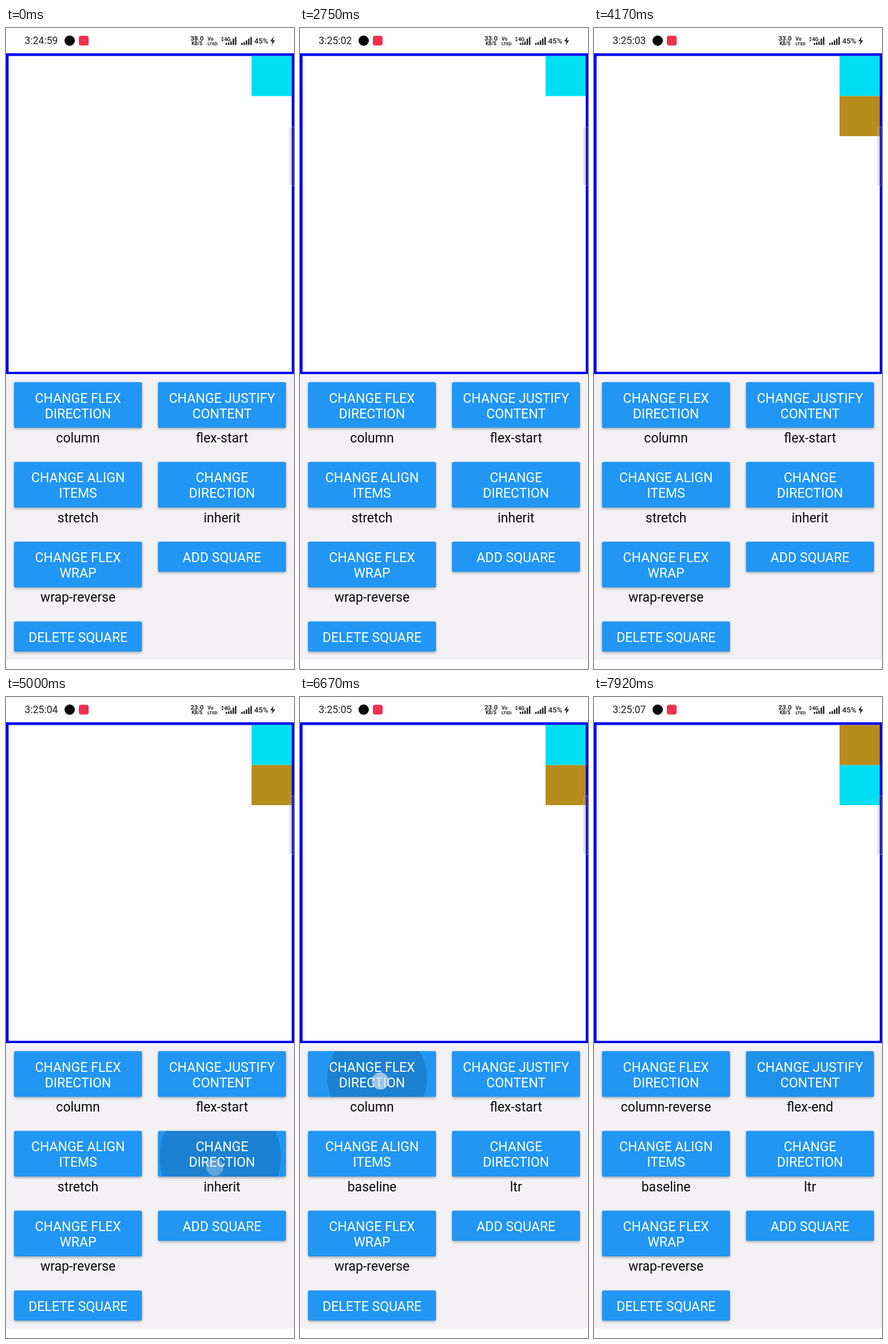
Animation, 502 px wide and 1115 px high, one loop 8 s. Source, as an HTML page:

```html
<!DOCTYPE html>
<html lang="en">
<head>
<meta charset="utf-8">
<title>Flex layout playground</title>
<style>
  html, body { margin: 0; width: 100%; height: 100%; overflow: hidden; background: #fefefe; }
  svg { display: block; width: 100vw; height: 100vh; }
  text { font-family: Roboto, "Noto Sans", sans-serif; }
  .caption { font-size: 23px; fill: #fff; text-anchor: middle; }
  .value { font-size: 23px; fill: #0a0a0a; text-anchor: middle; }
  .status { fill: #222; }
  .tiny { font-weight: 700; text-anchor: middle; }
  .face { fill: #2196f3; filter: drop-shadow(0 2.5px 2px rgba(0, 0, 0, .3)); }
</style>
</head>
<body>
<svg id="stage" viewBox="0 0 502 1115" xmlns="http://www.w3.org/2000/svg"></svg>
<script>
const LOOP = 8000;
const STEP = 250 / 3;
const stage = document.getElementById('stage');

function add(tag, attrs = {}, parent = stage, content = '') {
  const node = document.createElementNS('http://www.w3.org/2000/svg', tag);
  for (const key in attrs) node.setAttribute(key, attrs[key]);
  node.textContent = content;
  parent.appendChild(node);
  return node;
}
const rect = (x, y, width, height, fill, more = {}) =>
  add('rect', { x, y, width, height, fill, ...more });
const text = (x, y, cls, content, more = {}) =>
  add('text', { x, y, class: cls, ...more }, stage, content);
const set = (node, attrs) => {
  for (const key in attrs) node.setAttribute(key, attrs[key]);
};
const clamp = v => Math.max(0, Math.min(1, v));
const mix = (a, b, p) => a + (b - a) * p;

// Page background and status bar
rect(0, 0, 502, 1115, '#fefefe');
const clock = text(32.5, 28, 'status', '', { 'font-size': 17.6 });
add('circle', { cx: 111, cy: 22, r: 9, fill: '#050505' });
rect(127, 13.5, 17, 17, '#f0304f', { rx: 4 });
const speed = text(333, 22.3, 'status tiny', '', { 'font-size': 11.4 });
text(333, 30, 'status tiny', 'KB/S', { 'font-size': 8.4 });
text(356.5, 21.5, 'status tiny', 'Vo', { 'font-size': 8.6 });
text(360, 30, 'status tiny', 'LTED', { 'font-size': 7.8 });
add('path', { d: 'M375 18.2l2.3-3 2.3 3zM375 20.2l2.3 3 2.3-3z', class: 'status' });
text(385.8, 23, 'status tiny', '4G', { 'font-size': 9 });
function signal(x, heights) {
  heights.forEach((h, i) => rect(x + i * 4, 29.5 - h, 2.5, h, '#222'));
}
signal(383, [3.5, 4.5, 6, 11, 14]);
signal(410, [3.5, 5, 8, 11, 14]);
text(432.5, 27, 'status', '45%', { 'font-size': 13.3, 'font-weight': 500 });
add('path', { d: 'M466.5 15l-6 8.2h4l-1.6 6.8 6.3-8.4h-4.1z', class: 'status' });

// Flex container and its squares
rect(0, 602, 502, 497, '#f3f1f4');
rect(0, 44, 502, 558, '#0000f2');
rect(4.5, 48.7, 493.5, 549.3, '#fefdff');
const cyan = rect(428, 48.7, 70, 69.7, '#00def4');
const gold = rect(428, 118.4, 70, 69.7, '#b68c1c');
rect(494.5, 172, 14, 102, '#808080', {
  rx: 4, 'fill-opacity': .25, stroke: '#ccc', 'stroke-opacity': .5
});

// Buttons
const defs = add('defs');
function button(column, row, lines, value) {
  const x = column ? 265 : 14;
  const y = 616 + row * 138.75;
  const width = 223;
  const height = lines.length > 1 ? 79.6 : 52.6;
  const cx = x + width / 2;
  const box = { x, y, width, height, rx: 2.8 };
  const id = `clip-${column}-${row}`;
  add('rect', box, add('clipPath', { id }, defs));
  add('rect', { ...box, class: 'face' });
  const ripple = add('circle', { 'clip-path': `url(#${id})`, fill: '#000', opacity: 0 });
  lines.forEach((line, i) => text(cx, y + 35.6 + i * 27, 'caption', line));
  const label = value ? text(cx, y + 104.8, 'value', value) : null;
  return { cx, cy: y + height / 2, reach: Math.hypot(width, height) / 2, ripple, label };
}
const direction = button(0, 0, ['CHANGE FLEX', 'DIRECTION'], 'column');
const justify = button(1, 0, ['CHANGE JUSTIFY', 'CONTENT'], 'flex-start');
const align = button(0, 1, ['CHANGE ALIGN', 'ITEMS'], 'stretch');
const writing = button(1, 1, ['CHANGE', 'DIRECTION'], 'inherit');
button(0, 2, ['CHANGE FLEX', 'WRAP'], 'wrap-reverse');
const adder = button(1, 2, ['ADD SQUARE']);
button(0, 3, ['DELETE SQUARE']);

// Taps: finger position, ripple origin, start, fade length, moment the value changes
const taps = [
  { on: adder, x: 356, y: 941, start: 3580, life: 560, change: 3660 },
  { on: writing, x: 364, y: 818, start: 4830, visible: 4910, life: 480, change: 5075,
    values: ['inherit', 'ltr'] },
  { on: align, x: 173, y: 799, originX: 101, start: 5955, life: 430, change: 6160,
    values: ['stretch', 'baseline'] },
  { on: direction, x: 140, y: 668, start: 6580, life: 470, change: 6745,
    values: ['column', 'column-reverse'] },
  { on: justify, x: 390, y: 668, start: 7580, life: 390, change: 7745,
    values: ['flex-start', 'flex-end'] }
];
const finger = add('circle', { r: 14.5, fill: '#d3e2ee', stroke: '#e6eef4', 'stroke-width': 1 });

function drawTap(tap, t) {
  const { on } = tap;
  const age = t - tap.start;
  const shown = age >= 0 && t >= (tap.visible || 0);
  const grow = clamp(age / 225);
  const startRadius = 67;
  const fade = clamp(age / 60) * clamp((tap.life - age) / (tap.life - 170));
  set(on.ripple, {
    cx: mix(tap.originX || tap.x, on.cx, grow),
    cy: mix(tap.y, on.cy, grow),
    r: mix(startRadius, on.reach, grow),
    opacity: shown ? .14 * fade : 0
  });
  if (tap.values) on.label.textContent = tap.values[+(t >= tap.change)];
  if (age >= -40 && age < 250 && t >= (tap.visible || 0)) {
    set(finger, { cx: tap.x, cy: tap.y, opacity: .7 * clamp((250 - age) / 150) });
  }
}

function drawSquares(t) {
  const top = 48.7, side = 69.7, bottom = 598;
  const [added, reversed, ended] = [taps[0], taps[3], taps[4]].map(tap => t >= tap.change);
  const first = ended ? top + side : reversed ? bottom - side : top;
  const second = reversed ? first - side : first + side;
  set(cyan, { y: first });
  set(gold, { y: second, opacity: +added });
}

function render(now) {
  const t = Math.floor((now % LOOP + 5) / STEP) * STEP;
  const seconds = 59 + Math.floor((t + 255) / 1000);
  clock.textContent = seconds < 60 ? '3:24:59' : `3:25:0${seconds - 60}`;
  speed.textContent = t < 745 ? '38.0' : t < 4745 ? '33.0' : '23.0';
  set(finger, { opacity: 0 });
  taps.forEach(tap => drawTap(tap, t));
  drawSquares(t);
}

const begin = performance.now();
function tick() {
  render(performance.now() - begin);
  requestAnimationFrame(tick);
}
tick();
</script>
</body>
</html>
```
